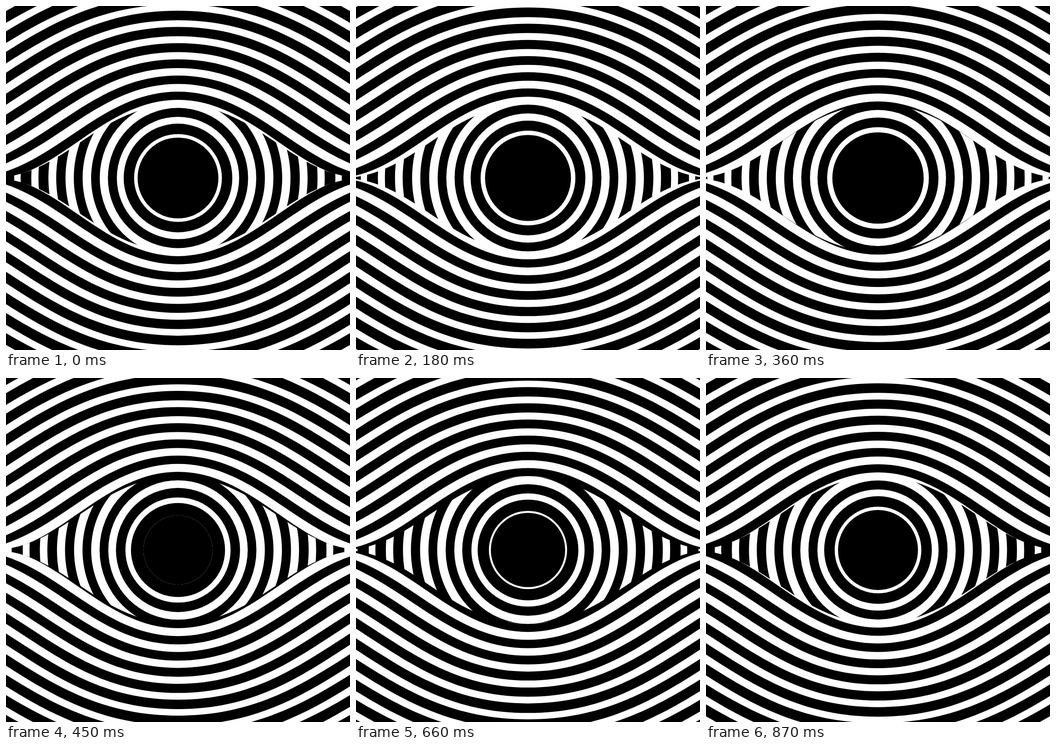
These frames come from a looping animation (748x748 px, 0.9 s). An HTML page with a canvas:

```html
<!DOCTYPE html>
<html lang="en">
<head>
<meta charset="utf-8">
<title>Hypnotic eye</title>
<style>
  html, body { margin: 0; width: 100%; height: 100%; overflow: hidden; background: #000; }
  canvas { display: block; width: 748px; height: 748px; }
</style>
</head>
<body>
<canvas id="stage" width="748" height="748"></canvas>
<script>
const SIZE = 748, MID = SIZE / 2, LOOP = 900, STEP = 30;
const BLACK = '#000', WHITE = '#fff';
const EYE_HEIGHT = 159.5;

const ctx = document.getElementById('stage').getContext('2d');
const iris = document.createElement('canvas');
iris.width = iris.height = SIZE;
const irisCtx = iris.getContext('2d');

// Four mirrored Bezier arcs: flat at the apex, tapering to a corner on each side.
function almond({ height, apexHandle, cornerHandle, corner, lift = 0 }) {
  ctx.beginPath();
  ctx.moveTo(MID - corner, MID);
  for (const [sx, sy] of [[-1, -1], [1, 1]]) {
    const px = d => MID + sx * d, py = d => MID + sy * d;
    ctx.bezierCurveTo(px(cornerHandle), py(lift), px(apexHandle), py(height), MID, py(height));
    ctx.bezierCurveTo(px(-apexHandle), py(height), px(-cornerHandle), py(lift), px(-corner), MID);
  }
  ctx.closePath();
}

function lid(age, color) {
  almond({
    height: EYE_HEIGHT + (color === BLACK ? 35.2 : 34.6) * age,
    apexHandle: 150 + 41 * age,
    cornerHandle: 254 + 31 * age,
    corner: 355 + 130 * age
  });
  ctx.fillStyle = color;
  ctx.fill();
}

// Rings start slowly at the pupil and settle to a steady speed.
const innerRadius = age => 30 + 39 * age + 35 * Math.exp(-0.62 * age);
const outerRadius = age => 58.6 + 37.2 * age - 12 * Math.exp(-3.6 * age);

function disc(radius, color) {
  irisCtx.fillStyle = color;
  irisCtx.beginPath();
  irisCtx.arc(MID, MID, radius, 0, Math.PI * 2);
  irisCtx.fill();
}

function drawIris(cycle) {
  irisCtx.fillStyle = BLACK;
  irisCtx.fillRect(0, 0, SIZE, SIZE);
  for (let k = 9; k >= 0; k--) {
    const age = cycle + k;
    if (age < 0.5) continue;
    disc(outerRadius(age), WHITE);
    disc(innerRadius(age), BLACK);
  }
}

function draw(time) {
  const cycle = time / LOOP;
  ctx.fillStyle = BLACK;
  ctx.fillRect(0, 0, SIZE, SIZE);

  for (let k = 13; k >= 0; k--) {
    const bands = [[cycle - 0.2 + k, BLACK], [cycle - 0.7 + k, WHITE]];
    for (const [age, color] of bands) if (age >= 0) lid(age, color);
  }

  drawIris(cycle);
  almond({ height: EYE_HEIGHT, apexHandle: 175, cornerHandle: 243, corner: 400, lift: 5 });
  ctx.fillStyle = ctx.createPattern(iris, 'no-repeat');
  ctx.fill();
}

function tick() {
  draw(Math.floor((performance.now() % LOOP) / STEP) * STEP);
  requestAnimationFrame(tick);
}
tick();
</script>
</body>
</html>
```
